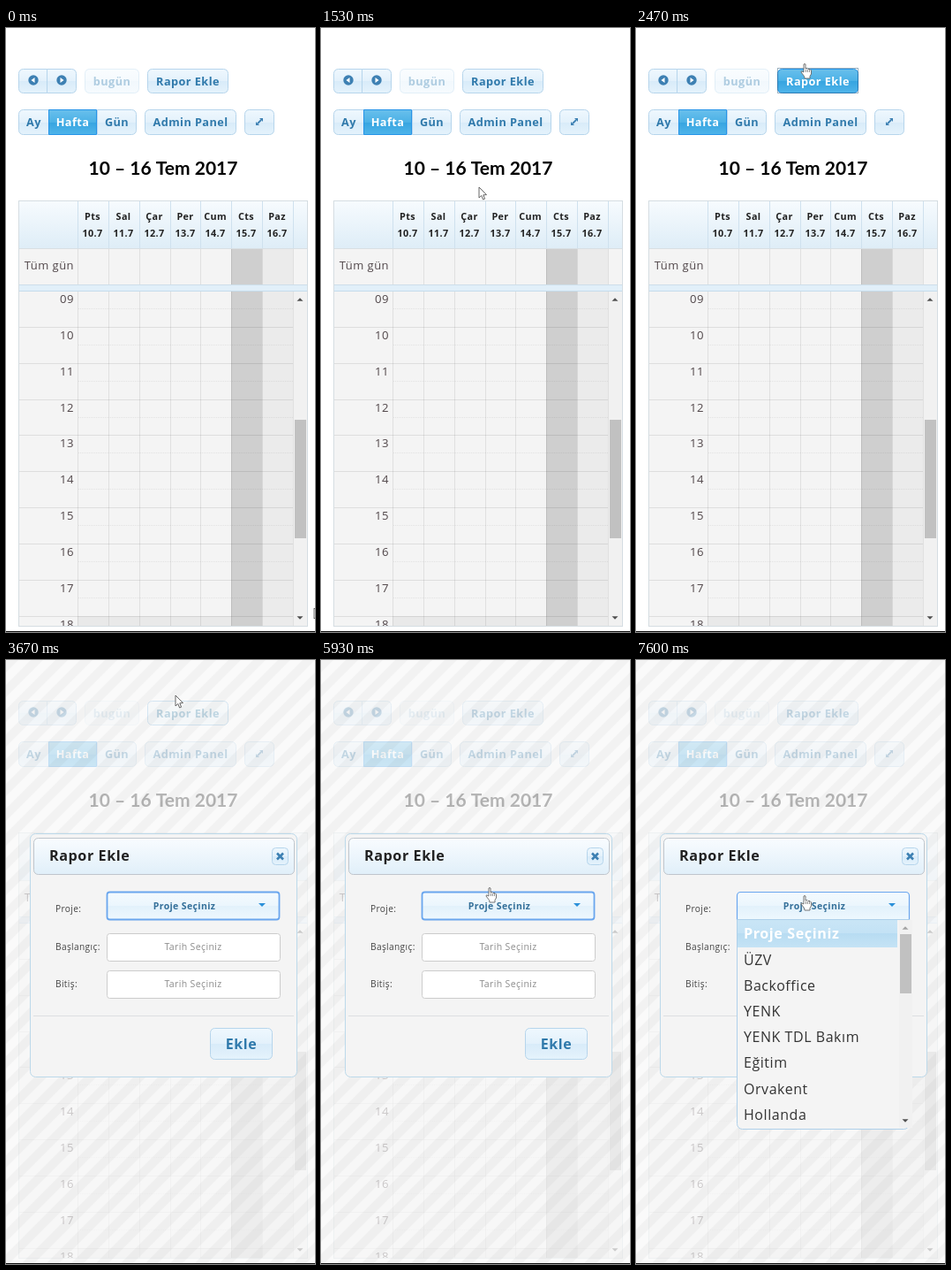
Animation, 350 px wide and 683 px high, one loop 8000 ms. Source, as an HTML page with a canvas:

```html
<!DOCTYPE html>
<html lang="tr">
<head>
<meta charset="utf-8">
<style>
html, body { margin: 0; width: 100%; height: 100%; overflow: hidden; background: #fff; }
canvas { display: block; }
</style>
</head>
<body>
<canvas id="stage" width="350" height="683"></canvas>
<script>
const ctx = document.getElementById('stage').getContext('2d');
const LOOP = 8000, TICK = 1000 / 15;
const UI = '"Open Sans", "Noto Sans", sans-serif';
const SKINS = {
  normal: { stops: ['#eff8fe', '#e3f1fb', '#d8ebf9', '#e5f3fc'], edge: '#b6d5ec', ink: '#2f79ab' },
  hover: { stops: ['#f4fafe', '#ebf6fd', '#e2f1fb', '#eef8fe'], edge: '#74b2e2', ink: '#1f75a5' },
  active: { stops: ['#6ac0ec', '#4bb1e6', '#36a4e0', '#50b5ea'], edge: '#2694e8', ink: '#fff' }
};
const DAYS = ['Pts', 'Sal', 'Çar', 'Per', 'Cum', 'Cts', 'Paz'];
const PROJECTS = ['ÜZV', 'Backoffice', 'YENK', 'YENK TDL Bakım', 'Eğitim', 'Orvakent', 'Hollanda'];

// Pointer path: time, x, y
const PATH = [
  [0, 349, 656], [867, 201, 501], [1533, 179, 180], [1733, 185, 87], [1800, 186, 75],
  [1933, 189, 56], [2267, 192, 40], [4333, 192, 40], [4933, 193, 191], [5200, 193, 234],
  [5400, 192, 254], [5867, 192, 254], [6067, 192, 262], [6267, 192, 262], [6333, 191, 262],
  [6400, 191, 262], [6600, 190, 266], [6933, 190, 266], [7000, 192, 266], [8000, 192, 266]
];

function pointerAt(t) {
  const i = Math.max(1, PATH.findIndex(k => k[0] >= t));
  const [a, b] = [PATH[i - 1], PATH[i]];
  const u = (t - a[0]) / (b[0] - a[0]);
  return [1, 2].map(n => Math.round(a[n] + (b[n] - a[n]) * u));
}

function rect(x, y, w, h, color) {
  ctx.fillStyle = color;
  ctx.fillRect(x, y, w, h);
}

function box(x, y, w, h, radius, fill, edge, line = 1) {
  ctx.beginPath();
  ctx.roundRect(x + .5, y + .5, w - 1, h - 1, radius);
  ctx.fillStyle = fill;
  ctx.fill();
  ctx.strokeStyle = edge;
  ctx.lineWidth = line;
  ctx.stroke();
}

function write(str, x, y, font, color, align, spacing = 0) {
  ctx.font = font;
  ctx.letterSpacing = `${spacing}px`;
  ctx.textAlign = align;
  ctx.fillStyle = color;
  ctx.fillText(str, x, y);
}

// Interface text is set slightly small with open tracking
function text(str, x, y, size, color, weight = 400, align = 'center') {
  write(str, x, y, `${weight} ${size * .94}px ${UI}`, color, align, size * .033);
}

function poly(points, fill, edge) {
  ctx.beginPath();
  points.forEach(p => ctx.lineTo(...p));
  ctx.closePath();
  ctx.fillStyle = fill;
  ctx.fill();
  if (edge) {
    ctx.strokeStyle = edge;
    ctx.lineWidth = .9;
    ctx.stroke();
  }
}

// Triangle pointing up (dir -1) or down (dir 1)
function caret(x, y, dir, color, r = 4) {
  poly([[x - r, y - dir * r / 2], [x + r, y - dir * r / 2], [x, y + dir * r / 2]], color);
}

function fade(y, h, top, bottom) {
  const g = ctx.createLinearGradient(0, y, 0, y + h);
  g.addColorStop(0, top);
  g.addColorStop(1, bottom);
  return g;
}

function glass(y, h, [a, b, c, d]) {
  const g = ctx.createLinearGradient(0, y, 0, y + h);
  [[0, a], [.5, b], [.5, c], [1, d]].forEach(s => g.addColorStop(...s));
  return g;
}

function button(x, y, w, h, label, skin = 'normal', radius = 5, size = 13.5) {
  const s = SKINS[skin];
  box(x, y, w, h, radius, glass(y, h, s.stops), s.edge);
  text(label, x + w / 2, y + h / 2 + size * .34, size, s.ink, 700);
}

function roundIcon(x, y, dir) {
  ctx.beginPath();
  ctx.arc(x, y, 5.7, 0, Math.PI * 2);
  ctx.fillStyle = '#3d80b3';
  ctx.fill();
  poly([[x + 2.5 * dir, y], [x - 1.5 * dir, y - 3], [x - 1.5 * dir, y + 3]], '#fff');
}

function toolbar(raporSkin, adminSkin, focused) {
  button(14, 46, 33, 28, '', 'normal', [5, 0, 0, 5]);
  button(46, 46, 34, 28, '', 'normal', [0, 5, 5, 0]);
  roundIcon(31, 59, -1);
  roundIcon(63, 59, 1);
  ctx.globalAlpha = .35;
  button(89, 46, 62, 28, 'bugün');
  ctx.globalAlpha = 1;
  button(160, 46, 92, 28, 'Rapor Ekle', raporSkin);
  if (focused) {
    ctx.setLineDash([1, 1]);
    ctx.strokeStyle = '#35617f';
    ctx.strokeRect(160.5, 45.5, 91, 28);
    ctx.setLineDash([]);
  }
  button(14, 92, 35, 29, 'Ay', 'normal', [5, 0, 0, 5]);
  button(103, 92, 45, 29, 'Gün', 'normal', [0, 5, 5, 0]);
  button(48, 92, 55, 29, 'Hafta', 'active', 0);
  button(157, 92, 104, 29, 'Admin Panel', adminSkin);
  button(270, 92, 34, 29, '');
  poly([[291, 102], [291, 106], [287, 102]], '#3d80b3');
  poly([[283, 110], [283, 106], [287, 110]], '#3d80b3');
  ctx.strokeStyle = '#3d80b3';
  ctx.lineWidth = 1.8;
  ctx.beginPath();
  ctx.moveTo(285, 108);
  ctx.lineTo(289, 104);
  ctx.stroke();
}

function calendar() {
  const colX = i => Math.round(81 + i * 34.85);
  const rowY = i => Math.round(297 + i * 40.87);
  write('10 – 16 Tem 2017', 178, 166, '700 21px Lato, sans-serif', '#000', 'center');

  rect(14, 195, 328, 482, '#f4f4f4');
  rect(14, 195, 328, 54, fade(195, 54, '#f7fbfe', '#deedf7'));
  rect(colX(5), 249, 35, 428, '#cfcfcf');
  rect(colX(6), 249, 35, 428, '#ebebeb');
  rect(81, rowY(9), 174, 11, '#e9e9e9');

  for (let i = 0; i < 10; i++) {
    if (i) rect(14, rowY(i), 311, 1, 'rgba(0,0,0,.09)');
    for (let x = 82; x < 325; x += 2) rect(x, rowY(i) + 20, 1, 1, 'rgba(0,0,0,.07)');
  }
  for (let i = 0; i < 8; i++) {
    rect(colX(i), 196, 1, 53, '#cfe1ee');
    rect(colX(i), 249, 1, 428, 'rgba(0,0,0,.08)');
  }
  rect(14, 249, 328, 1, '#d9dfe3');
  rect(14, 290, 328, 7, '#e1eff9');
  rect(14, 290, 328, 1, '#cddeea');
  rect(14, 297, 328, 1, '#c5dcec');

  DAYS.forEach((day, i) => {
    const x = colX(i) + 17;
    text(day, x, 217, 11.5, '#222', 700);
    text(`${10 + i}.7`, x, 236, 11.5, '#222', 700);
  });
  text('Tüm gün', 77, 273, 13.8, '#51474a', 400, 'right');
  ctx.save();
  ctx.beginPath();
  ctx.rect(14, 297, 328, 379);
  ctx.clip();
  for (let i = 0; i < 10; i++) {
    text(String(9 + i).padStart(2, '0'), 77, rowY(i) + 14, 14, '#51474a', 400, 'right');
  }
  ctx.restore();

  rect(326, 298, 15, 378, '#f1f1f1');
  rect(327, 443, 13, 134, '#c1c1c1');
  caret(333, 307, -1, '#505050', 3.5);
  caret(333, 667, 1, '#505050', 3.5);
  ctx.strokeStyle = '#d5dde2';
  ctx.lineWidth = 1;
  ctx.strokeRect(14.5, 195.5, 327, 481);
}

// Even white haze, then diagonal shading on top
function veil() {
  rect(0, 0, 350, 683, 'rgba(248,248,248,.73)');
  for (let x = 0; x < 1040; x += 28) {
    poly([[x, 0], [x + 14, 0], [x - 669, 683], [x - 683, 683]], 'rgba(0,0,0,.03)');
  }
}

function dialog(pressed) {
  box(27, 196, 303, 276, 6, '#f4f4f4', '#bcd9ea');
  box(31, 201, 296, 42, 5, fade(201, 42, '#f9fcff', '#e0eff9'), '#bfc5cc');
  text('Rapor Ekle', 49, 227, 17.2, '#222', 700, 'left');
  button(301, 212, 19, 20, '', 'normal', 4);
  ctx.strokeStyle = '#3d80b3';
  ctx.lineWidth = 2.6;
  ctx.beginPath();
  for (const d of [-1, 1]) {
    ctx.moveTo(307, 222 - 3.5 * d);
    ctx.lineTo(314, 222 + 3.5 * d);
  }
  ctx.stroke();

  [['Proje:', 284.5], ['Başlangıç:', 328], ['Bitiş:', 370]]
    .forEach(([label, y]) => text(label, 56, y, 10.8, '#444', 400, 'left'));
  box(114, 262, 196, 32, pressed ? [4, 4, 0, 0] : 3, glass(262, 32, SKINS.hover.stops),
    '#6aa6ee', pressed ? 1.2 : 1.8);
  text('Proje Seçiniz', 202, 282, 11.2, '#336f99', 700);
  caret(290, 277, 1, '#2b90d9');
  for (const y of [309, 351]) {
    box(114, y, 197, 32, 3, '#fff', '#ccc');
    text('Tarih Seçiniz', 212, y + 19, 11.2, '#8c8c8c');
  }
  rect(31, 402, 295, 1, '#dcdfe1');
  button(231, 416, 71, 36, 'Ekle', 'normal', 5, 17);
}

function dropdown() {
  box(114, 293, 196, 238, [0, 0, 6, 6], '#f4f4f4', '#aed0ea');
  rect(115, 294, 181, 31, glass(294, 31, ['#c9e5f6', '#c3e2f5', '#b8dcf2', '#c4e3f5']));
  text('Proje Seçiniz', 122, 315, 17.2, '#fff', 700, 'left');
  PROJECTS.forEach((name, i) => text(name, 122, 345 + i * 29.1, 17, '#333', 400, 'left'));
  rect(298, 294, 15, 235, '#f1f1f1');
  rect(299, 310, 13, 67, '#c1c1c1');
  caret(305, 303, -1, '#a3a3a3', 3.5);
  caret(305, 521, 1, '#505050', 3.5);
}

function arrowCursor() {
  poly([[0, 0], [0, 12], [2.8, 9.5], [4.6, 14], [6.6, 13.2], [4.8, 8.8], [8.5, 8.6]], '#fff', '#555');
}

function handCursor() {
  ctx.translate(-5, 0);
  poly([[3, 1], [4, .5], [5, 1], [5, 6], [7, 5.5], [8, 6.5], [10, 6.5], [11.5, 8], [11.5, 12],
    [10, 14.5], [10, 17], [4, 17], [3.5, 14.5], [0, 10], [.5, 8.8], [3, 10]], '#fff', '#666');
  for (const x of [5, 7, 9]) rect(x, 7, .8, 3, '#777');
}

function moveCursor() {
  for (let i = 0; i < 4; i++) {
    ctx.rotate(Math.PI / 2);
    poly([[0, -8.5], [3, -5.5], [1, -5.5], [1, -1], [-1, -1], [-1, -5.5], [-3, -5.5]], '#fff', '#777');
  }
  rect(-1, -1, 2, 2, '#fff');
}

function pointer(x, y, shape) {
  ctx.save();
  ctx.translate(x, y);
  shape();
  ctx.restore();
}

function draw(time) {
  const t = Math.floor(time / TICK + .05) * TICK + .5;
  const [x, y] = pointerAt(t);
  const open = t > 3666;
  const overRapor = y <= 68, overAdmin = y >= 86 && y <= 114;
  const pressed = !open && t > 2466;

  rect(0, 0, 350, 683, '#fff');
  toolbar(pressed ? 'active' : overRapor ? 'hover' : 'normal',
    !open && overAdmin ? 'hover' : 'normal', pressed);
  calendar();
  if (open) {
    veil();
    dialog(t > 7266);
    if (t > 7599) dropdown();
  }
  rect(0, 682, 350, 1, '#111');

  let shape = arrowCursor;
  if (open) {
    if (y >= 250) shape = handCursor;
    else if (y >= 188 && y < 233) shape = moveCursor;
  } else if (overRapor || overAdmin) shape = handCursor;
  pointer(x, y, shape);
}

function frame() {
  draw(performance.now() % LOOP);
  requestAnimationFrame(frame);
}
frame();
</script>
</body>
</html>
```
